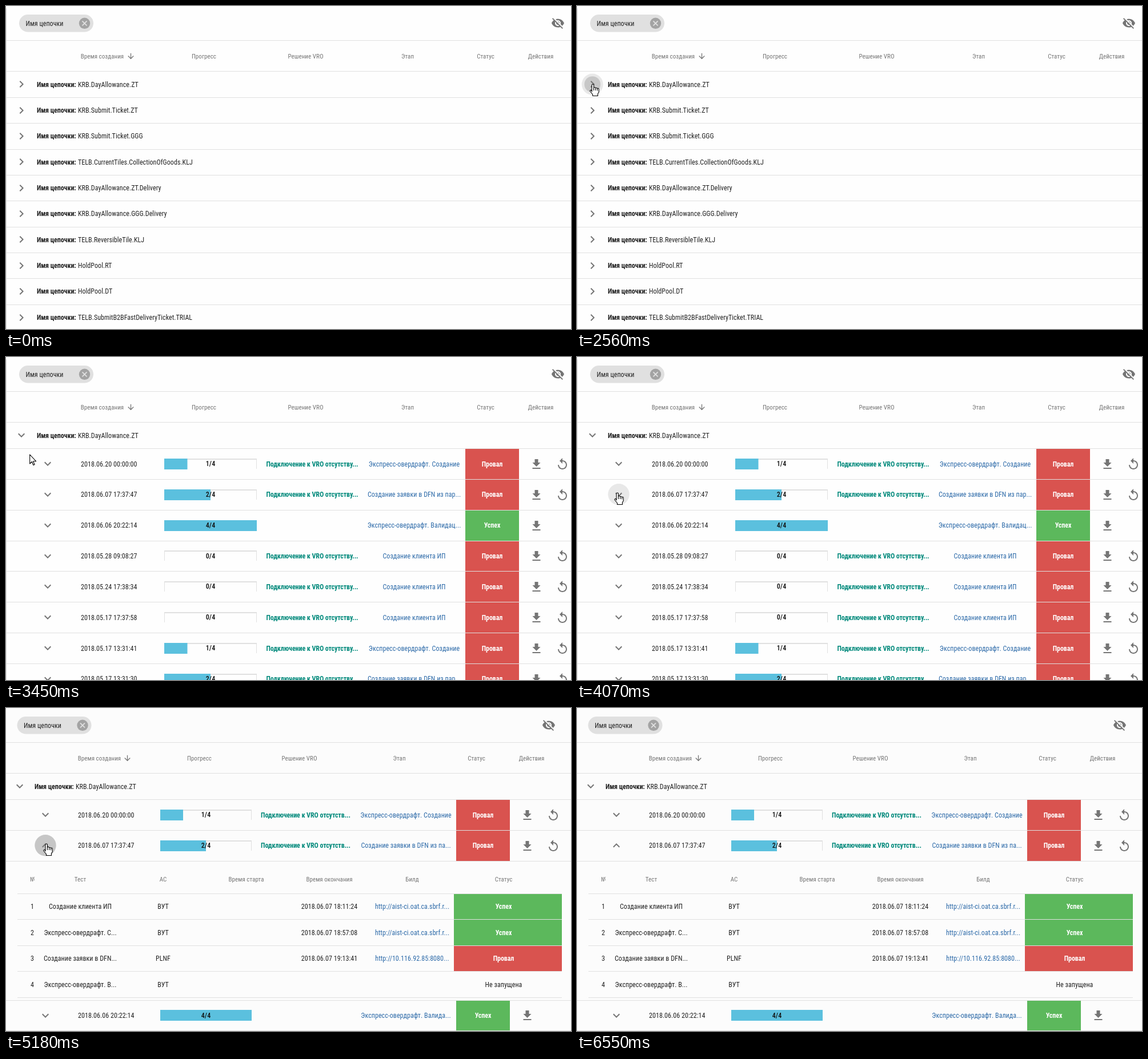
Animation of 989x566 px, one loop 8.22 s. Source, as an HTML page with a canvas:

```html
<!DOCTYPE html>
<html lang="ru">
<head>
<meta charset="utf-8">
<style>
html, body { margin: 0; width: 100%; height: 100%; overflow: hidden; background: #fefefe; }
canvas { display: block; }
</style>
</head>
<body>
<canvas id="stage" width="989" height="566"></canvas>
<script>
const W = 989, H = 566, LOOP = 8220;
const OPEN_GROUP = 2620, OPEN_ROW = 5180;
const ctx = document.getElementById('stage').getContext('2d');

const RED = '#d9534f', GREEN = '#5cb85c', BLUE = '#5bc0de', LINK = '#2b69a8';
const TEAL = '#00897b', INK = '#212121', GRAY = '#757575', LINE = '#e0e0e0';

const icon = {
  right: new Path2D('M10 6L8.59 7.41 13.17 12l-4.58 4.59L10 18l6-6z'),
  down: new Path2D('M16.59 8.59L12 13.17 7.41 8.59 6 10l6 6 6-6z'),
  up: new Path2D('M12 8l-6 6 1.41 1.41L12 10.83l4.59 4.58L18 14z'),
  sort: new Path2D('M20 12l-1.41-1.41L13 16.17V4h-2v12.17l-5.58-5.59L4 12l8 8 8-8z'),
  load: new Path2D('M19 9h-4V3H9v6H5l7 7 7-7zM5 18v2h14v-2H5z'),
  replay: new Path2D('M12 5V1L7 6l5 5V7c3.31 0 6 2.69 6 6s-2.69 6-6 6-6-2.69-6-6H4c0 4.42 3.58 8 8 8s8-3.58 8-8-3.58-8-8-8z'),
  hidden: new Path2D('M12 7c2.76 0 5 2.24 5 5 0 .65-.13 1.26-.36 1.83l2.92 2.92c1.51-1.26 2.7-2.89 3.43-4.75-1.73-4.39-6-7.5-11-7.5-1.4 0-2.74.25-3.98.7l2.16 2.16C10.74 7.13 11.35 7 12 7zM2 4.27l2.74 2.74C3.08 8.3 1.78 10.02 1 12c1.73 4.39 6 7.5 11 7.5 1.55 0 3.03-.3 4.38-.84L19.73 22 21 20.73 3.27 3zM7.53 9.8l1.55 1.55c-.05.21-.08.43-.08.65 0 1.66 1.34 3 3 3 .22 0 .44-.03.65-.08l1.55 1.55c-.67.33-1.41.53-2.2.53-2.76 0-5-2.24-5-5 0-.79.2-1.53.53-2.2zm4.31-.78l3.15 3.15.02-.16c0-1.66-1.34-3-3-3z'),
  hand: new Path2D('M-2 13V1.7a1.7 1.7 0 0 1 3.4 0V7a1.6 1.6 0 0 1 3.2.3a1.6 1.6 0 0 1 3 .7a1.4 1.4 0 0 1 2.6 1V14L8.4 17V20.5H-.5V18L-5 12.5a1.5 1.5 0 0 1 2-2z'),
  fingers: new Path2D('M1.4 7v4M4.6 7.5v3.5M7.6 8.3v3'),
  arrow: new Path2D('M0 0V16l3.7-3.5 2.5 6 2.2-1-2.5-5.8h5z')
};

const wide = {
  bg: '#fefefe', chip: 23, eye: 966, sort: 218.5, group: 27, label: 54, row: 73, date: 131,
  bar: 277, barW: 162, verdict: 536, step: 714.5, status: 804, load: 928.5, replay: 974,
  heads: [168.5, 346.5, 524.5, 703, 839.5, 936]
};
const narrow = {
  bg: '#fcfcfc', chip: 19.5, eye: 950, sort: 212.5, group: 24, label: 50, row: 69, date: 126,
  bar: 270, barW: 160, verdict: 524.5, step: 700, status: 788, load: 912.5, replay: 958,
  heads: [163.5, 338.5, 513.5, 688.5, 823.5, 920]
};

const HEADS = ['Время создания', 'Прогресс', 'Решение VRO', 'Этап', 'Статус', 'Действия'];
const CHAINS = [
  'KRB.DayAllowance.ZT', 'KRB.Submit.Ticket.ZT', 'KRB.Submit.Ticket.GGG',
  'TELB.CurrentTiles.CollectionOfGoods.KLJ', 'KRB.DayAllowance.ZT.Delivery',
  'KRB.DayAllowance.GGG.Delivery', 'TELB.ReversibleTile.KLJ', 'HoldPool.RT', 'HoldPool.DT',
  'TELB.SubmitB2BFastDeliveryTicket.TRIAL'
];
const VERDICT = 'Подключение к VRO отсутству...';
const CREATE = 'Экспресс-овердрафт. Создание';
const REQUEST = 'Создание заявки в DFN из пар...';
const CLIENT = 'Создание клиента ИП';
const RUNS = [
  ['2018.06.20 00:00:00', 1, CREATE],
  ['2018.06.07 17:37:47', 2, REQUEST],
  ['2018.06.06 20:22:14', 4, 'Экспресс-овердрафт. Валидац...'],
  ['2018.05.28 09:08:27', 0, CLIENT],
  ['2018.05.24 17:38:34', 0, CLIENT],
  ['2018.05.17 17:37:58', 0, CLIENT],
  ['2018.05.17 13:31:41', 1, CREATE],
  ['2018.05.17 13:31:30', 2, REQUEST]
];
const TEST_COLS = [46, 130, 275, 420.5, 566, 711, 871];
const TEST_HEADS = ['', 'Тест', 'АС', 'Время старта', 'Время окончания', 'Билд', 'Статус'];
const TESTS = [
  ['1', CLIENT, 'ВУТ', '', '2018.06.07 18:11:24', 'http://aist-ci.oat.ca.sbrf.r...', 'Успех'],
  ['2', 'Экспресс-овердрафт. С...', 'ВУТ', '', '2018.06.07 18:57:08', 'http://aist-ci.oat.ca.sbrf.r...', 'Успех'],
  ['3', 'Создание заявки в DFN...', 'PLNF', '', '2018.06.07 19:13:41', 'http://10.116.92.85:8080...', 'Провал'],
  ['4', 'Экспресс-овердрафт. В...', 'ВУТ', '', '', '', 'Не запущена']
];

// Tracking for the whole page, depending on the available cut of the face.
const FACE = '"Roboto Condensed", Roboto, sans-serif';
const SAMPLE = RUNS[0][0];
ctx.font = `condensed 12px ${FACE}`;
const BODY = ctx.measureText(SAMPLE).width < 101 ? 12 : 11.5;
const HEAD = BODY - 1;
ctx.font = `condensed ${BODY}px ${FACE}`;
const TRACKING = (98.5 - ctx.measureText(SAMPLE).width) / SAMPLE.length;

function text(str, x, y, color = INK, align = 'center', weight = 400, size = BODY) {
  ctx.font = `${weight} condensed ${size}px ${FACE}`;
  ctx.letterSpacing = (TRACKING - (weight === 700 ? 0.12 : 0)).toFixed(2) + 'px';
  ctx.textAlign = align;
  ctx.fillStyle = color;
  ctx.fillText(str, x, Math.round(y + 4.2));
}

function heading(str, x, y, align) {
  text(str, x, y, GRAY, align, 400, HEAD);
}

function box(x, y, w, h, color) {
  ctx.fillStyle = color;
  ctx.fillRect(x, y, w, h);
}

function line(y, x = 0, w = W) {
  box(x, Math.round(y), w, 1, LINE);
}

function disc(x, y, r, color) {
  ctx.fillStyle = color;
  ctx.beginPath();
  ctx.arc(x, y, r, 0, 7);
  ctx.fill();
}

function glyph(path, x, y, scale = 1) {
  ctx.save();
  ctx.translate(x - 12 * scale, Math.round(y) - 12 * scale);
  ctx.scale(scale, scale);
  ctx.fillStyle = GRAY;
  ctx.fill(path);
  ctx.restore();
}

function drawTop(L) {
  ctx.fillStyle = LINE;
  ctx.beginPath();
  ctx.roundRect(L.chip, 15, 130, 30.5, 15.25);
  ctx.fill();
  text('Имя цепочки', L.chip + 11.5, 30.5, INK, 'left');
  const x = L.chip + 114.5, y = 30.3;
  disc(x, y, 9.7, '#a3a3a3');
  ctx.strokeStyle = LINE;
  ctx.lineWidth = 1.8;
  ctx.beginPath();
  ctx.moveTo(x - 4, y - 4); ctx.lineTo(x + 4, y + 4);
  ctx.moveTo(x + 4, y - 4); ctx.lineTo(x - 4, y + 4);
  ctx.stroke();
  glyph(icon.hidden, L.eye, 30);
  line(60);
  HEADS.forEach((h, i) => heading(h, L.heads[i], 87.7));
  glyph(icon.sort, L.sort, 88, 0.65);
  line(114);
}

function drawChain(L, i, open) {
  const y = 137.3 + 45.36 * i;
  glyph(open ? icon.down : icon.right, L.group, y);
  text('Имя цепочки:', L.label, y, INK, 'left', 700);
  text(CHAINS[i], L.label + 72, y, INK, 'left');
  line(114.5 + 45.36 * (i + 1));
}

function drawBar(L, y, done) {
  const top = Math.round(y - 9.5), w = L.barW;
  box(L.bar, top, w, 2, LINE);
  box(L.bar, top, 1, 18, LINE);
  box(L.bar + w - 1, top, 1, 18, LINE);
  box(L.bar, top, w * done / 4, 19, BLUE);
  text(done + '/4', L.bar + w / 2, y - 0.5, '#111', 'center', 500);
}

function drawRun(L, i, top, open) {
  const [date, done, step] = RUNS[i];
  const y = top + 27.3, ok = done === 4;
  const fit = s => L === narrow ? s.replace(/.\.\.\.$/, '...') : s;
  glyph(open ? icon.up : icon.down, L.row, y - 0.3);
  text(date, L.date, y, INK, 'left');
  drawBar(L, y, done);
  if (!ok) text(fit(VERDICT), L.verdict, y, TEAL, 'center', 700);
  text(fit(step), L.step, y, LINK);
  box(L.status, Math.round(top), 94, 54, ok ? GREEN : RED);
  text(ok ? 'Успех' : 'Провал', L.status + 47, y, '#fff', 'center', 700);
  glyph(icon.load, L.load, y + 0.5);
  if (!ok) glyph(icon.replay, L.replay, y + 0.5);
  line(top);
  line(top + 53.85);
}

function drawTests() {
  ctx.save();
  ctx.beginPath();
  ctx.rect(42, 285, 8, 30);
  ctx.clip();
  heading('№', 42, 299.5, 'left');
  ctx.restore();
  TEST_HEADS.forEach((h, i) => heading(h, TEST_COLS[i], 299.5));
  line(325, 20, 953);
  TESTS.forEach((cells, row) => {
    const top = 325 + 45.4 * row, y = top + 23.2, state = cells[6];
    const fill = { 'Успех': GREEN, 'Провал': RED }[state];
    if (fill) box(784, Math.round(top) + 1, 189, 45, fill);
    cells.forEach((cell, i) => {
      const onFill = i === 6 && fill;
      text(cell, TEST_COLS[i], y, onFill ? '#fff' : i === 5 ? LINK : INK, 'center', onFill ? 700 : 400);
    });
    line(top + 45.4, 20, 953);
  });
}

// Each move: start, end, number of steps, destination.
const MOVES = [
  [1020, 1310, 5, 24, 139],
  [1740, 1860, 3, 29, 138],
  [2110, 2110, 1, 28, 137],
  [3180, 3980, 12, 69, 239],
  [4070, 4070, 1, 71, 238],
  [6410, 6550, 3, -16, 237]
];

function cursorAt(t) {
  let x = -14, y = 132;
  for (const [start, end, steps, tx, ty] of MOVES) {
    if (t < start) break;
    const done = t >= end ? 1 : (Math.floor((t - start) / (end - start) * (steps - 1)) + 1) / steps;
    x += (tx - x) * done;
    y += (ty - y) * done;
  }
  return { x, y };
}

function drawHover(cursor, x, y, t, press) {
  if (Math.hypot(cursor.x - x, cursor.y - y) > 19) return false;
  disc(x, y, 18.7, 'rgba(0,0,0,.085)');
  if (t >= press) {
    const k = Math.min(1, (t - press + 10) / 200);
    disc(x, y, 18.7 * (1 - (1 - k) ** 2), 'rgba(0,0,0,.14)');
  }
  return true;
}

function drawCursor({ x, y }, hand) {
  ctx.save();
  ctx.translate(x, y);
  ctx.lineWidth = 1.1;
  ctx.lineJoin = 'round';
  ctx.strokeStyle = '#000';
  ctx.fillStyle = '#fff';
  const shape = hand ? icon.hand : icon.arrow;
  ctx.fill(shape);
  ctx.stroke(shape);
  if (hand) ctx.stroke(icon.fingers);
  ctx.restore();
}

function draw(t) {
  const groupOpen = t >= OPEN_GROUP, rowOpen = t >= OPEN_ROW;
  const L = rowOpen ? narrow : wide;
  const cursor = cursorAt(t);
  box(0, 0, W, H, L.bg);

  const overGroup = drawHover(cursor, L.group, 137.3, t, 2470);
  const overRow = groupOpen && drawHover(cursor, L.row, 240.7, t, 4800);

  drawTop(L);
  if (!groupOpen) CHAINS.forEach((_, i) => drawChain(L, i, false));
  else {
    drawChain(L, 0, true);
    RUNS.forEach((_, i) => {
      if (rowOpen && i > 2) return;
      drawRun(L, i, rowOpen && i === 2 ? 511.5 : 160 + 53.85 * i, rowOpen && i === 1);
    });
    if (rowOpen) drawTests();
  }
  if (!rowOpen) box(0, 4, 1, H, LINE);
  if (t >= 1020 && t < 6550) drawCursor(cursor, overGroup || overRow);
}

const begin = performance.now();
function tick() {
  draw((performance.now() - begin) % LOOP);
  requestAnimationFrame(tick);
}
tick();
</script>
</body>
</html>
```
